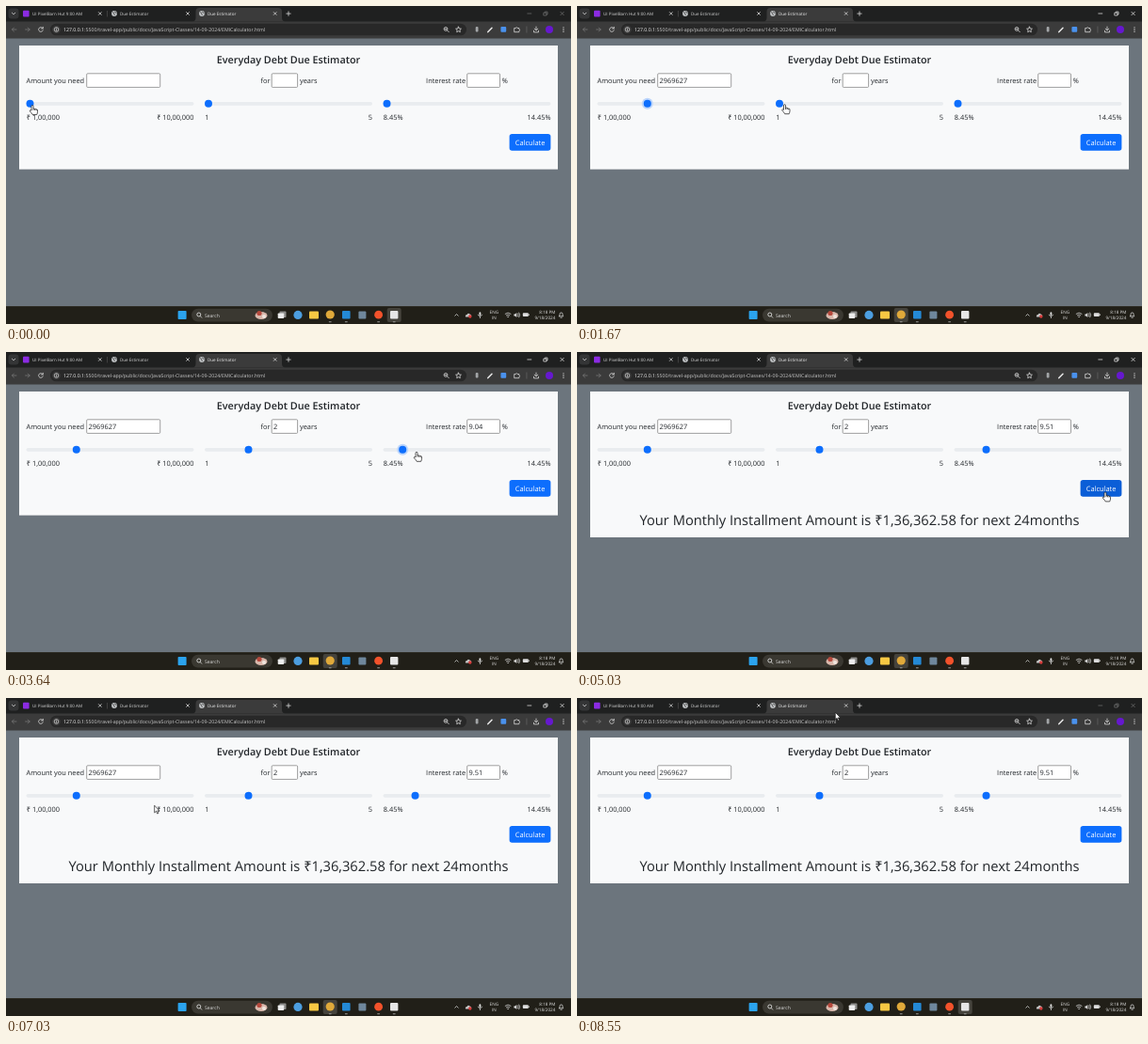
Write an HTML page that moves like this. It is 600 px wide and 338 px high and loops after 8.58 s.

```html
<!DOCTYPE html>
<html lang="en">
<head>
<meta charset="utf-8">
<title>Due Estimator</title>
<style>
  html, body { margin: 0; width: 100%; height: 100%; overflow: hidden; background: #6c757d; }
  svg { display: block; width: 100%; height: 100%; }
  text { font-family: "Open Sans", "Noto Sans", sans-serif; text-rendering: geometricPrecision; white-space: pre; }
  .line { fill: none; stroke: #d8d8d8; stroke-width: .8; stroke-linecap: round; stroke-linejoin: round; }
  .dim { stroke: #777; }
  .field { fill: #fff; stroke: #777; stroke-width: .7; }
</style>
</head>
<body>
<svg id="stage" viewBox="0 0 600 338" xmlns="http://www.w3.org/2000/svg"></svg>
<script>
const LOOP = 8580;
const INK = '#212529', BLUE = '#0d6efd', PALE = '#e3e3e3';
const stage = document.getElementById('stage');

const rect = (x, y, w, h, fill, r = 0, more = '') =>
  `<rect x="${x}" y="${y}" width="${w}" height="${h}" rx="${r}" fill="${fill}" ${more}/>`;
const dot = (x, y, r, fill, more = '') => `<circle cx="${x}" cy="${y}" r="${r}" fill="${fill}" ${more}/>`;
const line = (d, cls = '', more = '') => `<path class="line ${cls}" d="${d}" ${more}/>`;
const text = (x, y, size, str, fill = INK, more = '') =>
  `<text x="${x}" y="${y}" font-size="${size}" fill="${fill}" ${more}>${str}</text>`;
const END = 'text-anchor="end"', MID = 'text-anchor="middle"';

const cross = (x, y, r) => line(`M${x - r} ${y - r}l${2 * r} ${2 * r}m0 ${-2 * r}l${-2 * r} ${2 * r}`);
const globe = (x, y) => dot(x, y, 2.9, '#c4c7c9') +
  `<path d="M${x - 2} ${y - 1.3}q2 .2 1.8 1.4t1 2M${x + .4} ${y - 2.4}q0 1.6 2 1.8" fill="none" stroke="#3c3c3c" stroke-width=".8"/>`;

function browserBar() {
  const tab = (x, label, fill) => text(x, 9.8, 4.55, label, fill) ;
  return rect(0, 0, 600, 17, '#1f2020') + rect(0, 16.5, 600, 18, '#3b3b3b') +
    rect(2.5, 2.5, 11, 11, '#343536', 3.2) + line('M6.4 7.2l1.7 1.7l1.7-1.7') +
    `<path d="M197.5 16.6q4 0 4-4V6q0-4 4-4H289q4 0 4 4v6.6q0 4 4 4z" fill="#3b3b3b"/>` +
    rect(18, 4.8, 6.6, 6.6, '#8b2be2', 1) +
    tab(28, 'UI PixelBarn Hut 9:00 AM', '#d4d4d4') +
    globe(115, 8) + tab(121, 'Due Estimator', '#d4d4d4') +
    globe(208, 8) + tab(214, 'Due Estimator', '#f0f0f0') +
    [99.8, 193, 285.7].map(x => cross(x, 8, 1.4)).join('') +
    rect(107, 5, .6, 6.5, '#555') +
    line('M300 5.9v4.4m-2.2-2.2h4.4') +
    `<g id="controls">${line('M553.8 8h4')}${line('M571.2 7.2h2.8v2.8h-2.8zM572.2 7v-.9h2.8v2.9h-.9')}${cross(590.6, 8, 1.7)}</g>` +
    // address bar
    line('M11 25H6.4m2-2l-2 2l2 2', 'dim') + line('M20.6 25h4.6m-2-2l2 2l-2 2', 'dim') +
    line('M39 23.6a2.4 2.4 0 1 0 .3 2.2M39.3 22.3v1.7h-1.7') +
    rect(47, 18.7, 442, 12.6, '#282828', 6.3) + dot(53.5, 25, 4.3, '#3b3b3b') +
    dot(53.5, 25, 2.3, 'none', 'stroke="#ddd" stroke-width=".7"') + line('M53.5 24.9v1.1m0-2.2v0') +
    text(61, 26.9, 5.23, '127.0.0.1<tspan fill="#c9c9c9">:5500/travel-app/public/docs/JavaScript-Classes/14-09-2024/EMICalculator.html</tspan>', '#f4f4f4') +
    dot(467, 24.4, 1.9, 'none', 'stroke="#ddd" stroke-width=".8"') + line('M468.5 25.9l1.8 1.8M466.1 24.4h1.8') +
    line('M480.5 22.1l.9 1.9l2 .2l-1.5 1.4l.4 2.1l-1.8-1l-1.8 1l.4-2.1l-1.5-1.4l2-.2z') +
    rect(498.7, 22, 2.8, 5.6, '#a3a6a8', 1) +
    line('M511.8 27.6l4.2-4.4', '', 'style="stroke:#e8e8e8;stroke-width:1.5"') +
    rect(525.4, 22, 5.8, 5.8, '#4a91ec', 1) +
    line('M540.1 23.5h1.3q.8-2 1.6 0h1.9v1.4q1.8.7 0 1.5v1.3h-4.8z') +
    rect(552.6, 21.5, .7, 7, '#666') +
    line('M563 22v3.7m-1.8-1.6l1.8 1.7l1.8-1.7M560.5 26.2v1.7h5v-1.7') +
    dot(577, 25, 4, '#6618cf') +
    [22.8, 25, 27.2].map(y => dot(592, y, .65, '#ddd')).join('');
}

const SLIDERS = [
  { x: 21.5, min: 1e5, max: 1e7, low: '₹ 1,00,000', high: '₹ 10,00,000', box: [85.7, 78] },
  { x: 211, min: 1, max: 5, low: '1', high: '5', box: [282.2, 27.4] },
  { x: 400.5, min: 8.45, max: 14.45, low: '8.45%', high: '14.45%', box: [489.7, 34.8] }
];

function form() {
  const sliders = SLIDERS.map((s, i) =>
    `<rect class="field" x="${s.box[0]}" y="71.8" width="${s.box[1]}" height="14.6" rx="1"/>` +
    text(s.box[0] + 1.9, 82.2, 7.4, '', INK, `id="value${i}"`) +
    rect(s.x, 102, 178, 3.7, '#e9ecef', 1.85) +
    `<g id="thumb${i}">${dot(0, 0, 6, '#bcd5fb', `id="ring${i}"`)}${dot(0, 0, 4, BLUE)}</g>` +
    text(s.x + .3, 121.2, 7.4, s.low) + text(s.x + 178, 121.2, 7.4, s.high, INK, END)).join('');
  return rect(14, 42, 572, 131.6, '#f8f9fa', 0, 'id="panel"') +
    text(300, 61.3, 10.8, 'Everyday Debt Due Estimator', INK, MID + ' font-weight="600"') +
    text(21.5, 82.2, 7.4, 'Amount you need') + text(270.5, 82.2, 7.4, 'for') + text(312, 82.2, 7.4, 'years') +
    text(488, 82.2, 7.35, 'Interest rate', INK, END) + text(526.8, 82.2, 7.4, '%') + sliders +
    rect(534.6, 136, 43.8, 17.8, BLUE, 2.8, 'id="button"') +
    text(556.6, 148.3, 7.45, 'Calculate', '#fff', MID) +
    text(300, 184.2, 14.69, 'Your Monthly Installment Amount is ₹1,36,362.58 for next 24months', INK, MID + ' id="result"');
}

function taskbar() {
  const running = x => rect(x - 1.5, 335.3, 3, .9, '#9a9a98', .4);
  return rect(0, 319, 600, 19, '#211f18') + rect(0, 319, 600, .5, '#34322b') +
    rect(0, 0, 15, 15, '#45433c', 2, 'id="active"') +
    rect(182.6, 324, 9, 9, '#2ba3ee', .8) +
    rect(197, 321.8, 86, 13.6, '#3a3831', 6.8) +
    dot(204.8, 328, 2, 'none', 'stroke="#eee" stroke-width=".8"') + line('M206.3 329.6l1.5 1.6') +
    text(211, 330.5, 5, 'Search', '#dcdcdc') +
    `<ellipse cx="271" cy="329" rx="6.5" ry="4" fill="#d9b8ac"/>` + dot(269, 326.5, 2.6, '#b5483c') + dot(274, 330, 2, '#f0e6df') +
    rect(290.5, 324.6, 7, 6.4, '#8d8d8b', .8) + rect(288.7, 326.4, 6.5, 5.6, '#ececec', .8) +
    dot(310, 328.4, 4.6, '#4c9ee0') +
    rect(322, 324.4, 10, 8, '#f7c843', 1) +
    dot(344.2, 328, 4.6, '#e0a93a') +
    rect(357, 324, 8.6, 8.6, '#2489d6', 1) +
    rect(374.4, 324.4, 8, 8, '#6f879c', 1) +
    dot(395.6, 328.2, 4.4, '#f2522b') +
    rect(408, 324, 8.4, 8.4, '#e6e6e6', 1) +
    [344.2, 361.3, 395.6, 412.2].map(running).join('') +
    line('M476.8 329.2l1.7-1.7l1.7 1.7') +
    `<path d="M488 330.6q-.6-2.4 1.6-2.5q1-2.4 3-.6q2.2.6 1.4 3.1z" fill="#c4c4c4"/>` + dot(492.8, 330, 1.7, '#d83b3b') +
    rect(502.5, 325.3, 1.8, 3.6, '#ddd', .9) + line('M501.3 328.2q2.1 3.6 4.2 0M503.4 330v1.6') +
    text(518.3, 327.2, 4.6, 'ENG', PALE, MID) + text(518.3, 333.4, 4.6, 'IN', PALE, MID) +
    line('M530.2 327.2q2.9-2.4 5.8 0M531.4 328.8q1.7-1.4 3.4 0') + dot(533.1, 330.4, .7, '#ddd') +
    `<path d="M539.4 327.4h1.3l1.6-1.5v5l-1.6-1.5h-1.3z" fill="#ddd"/>` + line('M543.6 327q1.2 1.4 0 2.8M544.8 326q1.9 2.4 0 4.8') +
    rect(548.8, 326.3, 6, 3.8, '#ddd', .8) + rect(555.1, 327.4, .7, 1.6, '#ddd') +
    text(583.4, 326.9, 4.55, '8:18 PM', PALE, END) + text(583.4, 333.4, 4.65, '9/18/2024', PALE, END) +
    line('M587.4 329.8h4.4q-.7-.8-.7-2.2q0-1.7-1.5-1.7t-1.5 1.7q0 1.4-.7 2.2M589 331.2h1.2');
}

const pointers =
  `<g id="pointer"><path id="arrow" d="M0 0V7.7L1.8 6.1L3 8.8L4.2 8.3L3 5.7H5.4Z" fill="#fff" stroke="#111" stroke-width=".65" stroke-linejoin="round"/>
  <path id="hand" d="M-1 .9Q-1-.1 0-.1T1 .9V3.5Q2.2 2.9 2.6 3.8Q3.7 3.3 4.1 4.3Q5.5 4 5.5 5.3V7Q5.4 8.4 4.7 9.9H.2Q-.6 8.2-2.6 6.3Q-3.1 5.3-2 5Q-1.5 5-1 5.6ZM1 3.5V5.2M2.6 3.9V5.3M4.1 4.4V5.5" fill="#fff" stroke="#111" stroke-width=".7" stroke-linejoin="round"/></g>`;

stage.innerHTML = rect(0, 0, 600, 338, '#6c757d') + form() + browserBar() + taskbar() + pointers;
const el = id => document.getElementById(id);
const set = (id, name, v) => el(id).setAttribute(name, v);
const show = (id, on) => set(id, 'visibility', on ? 'visible' : 'hidden');

// rows: time, then one or more eased values
function tween(rows, t) {
  const i = rows.findIndex(r => r[0] > t);
  if (i < 0) return rows[rows.length - 1].slice(1);
  if (i === 0) return rows[0].slice(1);
  const a = rows[i - 1], b = rows[i];
  const p = (t - a[0]) / (b[0] - a[0]), e = p * p * (3 - 2 * p);
  return a.slice(1).map((v, k) => v + (b[k + 1] - v) * e);
}

const PATH = [
  [0, 28, 105.6], [280, 28, 105.6], [1050, 77, 105.4], [1220, 77, 105.4], [1670, 220.5, 104.8],
  [1800, 217, 104.6], [1950, 217, 104.6], [2400, 259, 105.2], [2650, 259, 105.2], [3120, 406.5, 105.6],
  [3280, 406.5, 105.6], [3640, 436, 106.4], [3950, 436.4, 106.4], [4500, 561, 149], [5200, 561, 149],
  [6210, 72.8, 164], [6600, 76, 164], [7700, 316, 17.6], [7950, 316, 17.6], [8450, 274.3, 15.2], [8580, 274.3, 15.2]
];
const AMOUNT = [[340, 1e5], [1110, 2969627]];
const RATE = [[3340, 8.45], [3600, 9.04], [3660, 9.04], [3740, 9.51]];
const PRESS = [280, 1900, 3260, 4780];

function draw(t) {
  const [x, y] = tween(PATH, t);
  const values = [Math.round(tween(AMOUNT, t)[0]), t < 2220 ? 1 : 2, tween(RATE, t)[0].toFixed(2)];
  const touched = [t > 370, t >= 2220, t > 3370];
  const focus = PRESS.filter(p => t >= p).length - 1;

  SLIDERS.forEach((s, i) => {
    const part = (values[i] - s.min) / (s.max - s.min);
    set('thumb' + i, 'transform', `translate(${s.x + 4 + 170 * part} 103.8)`);
    show('ring' + i, focus === i);
    el('value' + i).textContent = touched[i] ? values[i] : '';
  });

  const onButton = x > 534 && x < 579 && y > 136 && y < 154;
  const onSlider = y > 99 && y < 109 && SLIDERS.some(s => x > s.x && x < s.x + 178);
  set('button', 'fill', onButton ? '#0b5ed7' : BLUE);

  const done = t >= 4840;
  set('panel', 'height', done ? 155 : 131.6);
  show('result', done);

  const away = t < 280 || t > 8480;
  set('controls', 'opacity', away ? .4 : 1);
  set('active', 'transform', `translate(${away ? 404.7 : 336.7} 321)`);

  set('pointer', 'transform', `translate(${x} ${y})`);
  show('hand', onButton || onSlider);
  show('arrow', !(onButton || onSlider));
}

const start = performance.now();
function frame() {
  draw((performance.now() - start) % LOOP);
  requestAnimationFrame(frame);
}
draw(0);
requestAnimationFrame(frame);
</script>
</body>
</html>
```
